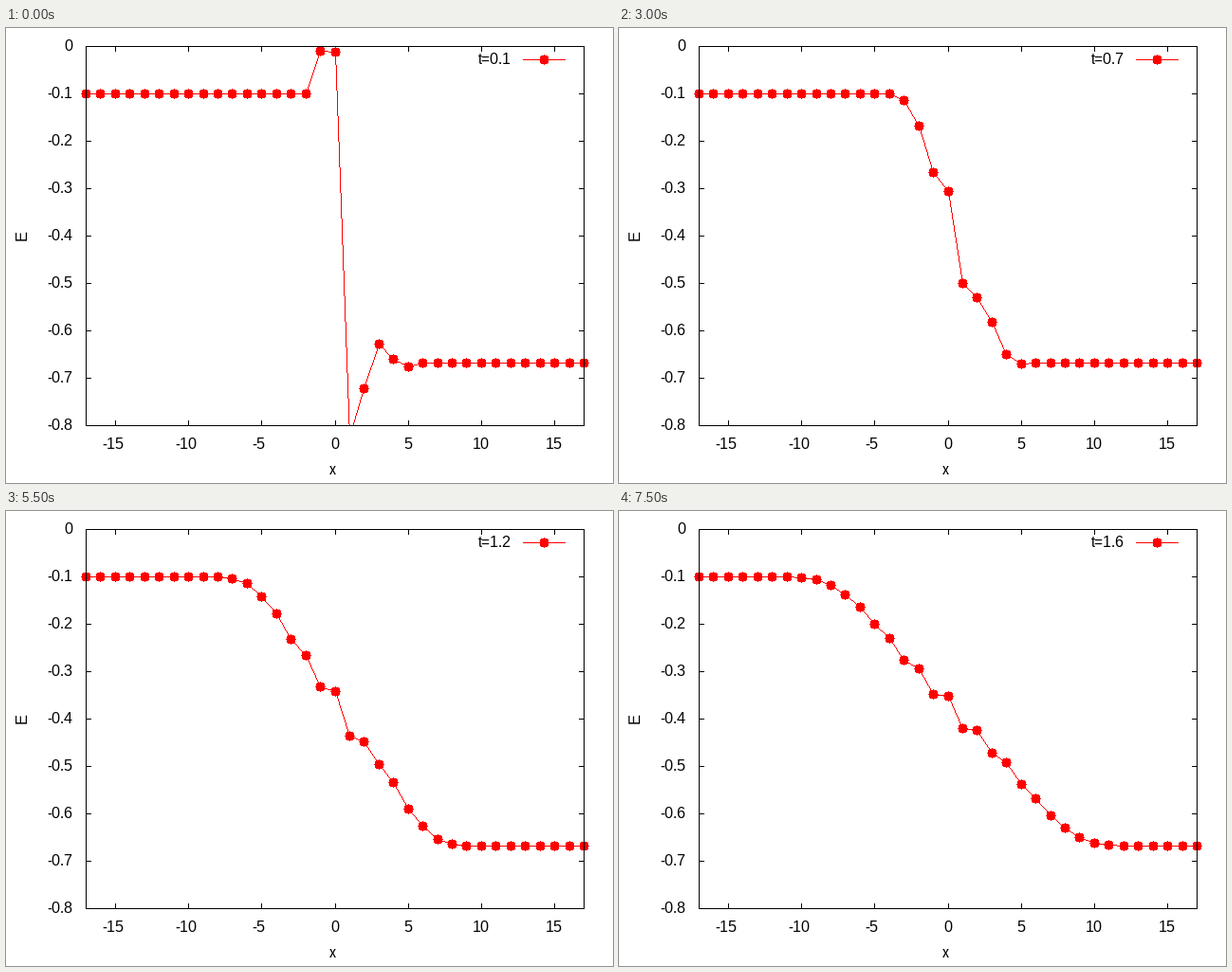
Animation, 640 px wide and 480 px high, one loop 8 s. Source, as a matplotlib script:

```python
import math

import numpy as np
import matplotlib.pyplot as plt
from matplotlib.animation import FuncAnimation

W, H, DPI = 640, 480, 100
LEFT, RIGHT, TOP, BOTTOM = 84, 609, 19, 419
FRAMES, STEP = 16, 500
RED, BLACK = (255, 0, 0), (0, 0, 0)
TICK, RADIUS = 5, 5

plt.rcParams.update({
    "font.family": "Liberation Sans",
    "font.size": 16 * 72 / DPI,
    "text.hinting": "default",
    "text.hinting_factor": 1,
})

sites = np.arange(-17, 18)
erf = np.vectorize(math.erf)

# Initial disturbance at the junction: site -> (strength, fade time)
KICKS = {
    -1: (0.096, 0.25), 0: (0.087, 0.45), 1: (-0.156, 0.58),
    2: (-0.054, 0.8), 3: (0.04, 0.65), 4: (0.008, 0.8), 5: (-0.008, 0.5),
}


def energy(t):
    """Ballistically widening step, plus a ripple and the fading kicks."""
    d = sites - 0.5
    u = d / (t * (1 - math.exp(-(t / 0.45) ** 2)))
    e = -0.384 - 0.284 * erf((0.22 * u + 0.0047 * u ** 3) / math.sqrt(2))
    sign = np.where(sites % 2, -1, 1)
    e += sign * 0.018 / math.sqrt(t) * np.exp(-(d / (2.5 * t)) ** 2)
    for site, (strength, fade) in KICKS.items():
        e[sites == site] += strength / (1 + (t / fade) ** 3)
    return e


def px_x(x):
    return np.floor(LEFT + (x + 17) * (RIGHT - LEFT) / 34 + 0.5).astype(int)


def px_y(e):
    return np.floor(TOP - e * (BOTTOM - TOP) / 0.8 + 0.5).astype(int)


def line(img, x0, y0, x1, y1, color):
    """One pixel wide, without smoothing, kept inside the plot rows."""
    n = max(abs(x1 - x0), abs(y1 - y0)) + 1
    xs = np.rint(np.linspace(x0, x1, n)).astype(int)
    ys = np.rint(np.linspace(y0, y1, n)).astype(int)
    keep = (ys >= TOP) & (ys <= BOTTOM)
    img[ys[keep], xs[keep]] = color


dy, dx = np.mgrid[-RADIUS:RADIUS + 1, -RADIUS:RADIUS + 1]
disc = dx ** 2 + dy ** 2 <= RADIUS ** 2


def dot(img, x, y):
    img[y + dy[disc], x + dx[disc]] = RED


def border(img):
    for x in (LEFT, RIGHT):
        line(img, x, TOP, x, BOTTOM, BLACK)
    for y in (TOP, BOTTOM):
        line(img, LEFT, y, RIGHT, y, BLACK)


fig = plt.figure(figsize=(W / DPI, H / DPI), dpi=DPI, facecolor="white")


def label(x, y, text, ha="center", va="baseline", **kw):
    return fig.text(x / W, 1 - y / H, text, ha=ha, va=va, **kw)


backdrop = np.full((H, W, 3), 255, np.uint8)

for v in range(-15, 16, 5):
    x = px_x(v)
    line(backdrop, x, TOP, x, TOP + TICK, BLACK)
    line(backdrop, x, BOTTOM, x, BOTTOM - TICK, BLACK)
    label(x - (2.5 if v < 0 else 0.5), 444, str(v))

for i in range(9):
    y = px_y(-i / 10)
    line(backdrop, LEFT, y, LEFT + TICK, y, BLACK)
    line(backdrop, RIGHT, y, RIGHT - TICK, y, BLACK)
    label(70.5, y + 5, f"{-i / 10:g}" if i else "0", ha="right")

label(344, 471, "x")
label(16.9, 218.6, "E", va="center", rotation=90)

line(backdrop, 545, 33, 589, 33, RED)
dot(backdrop, 567, 33)
legend = label(532.5, 38, "", ha="right")
picture = fig.figimage(backdrop, origin="upper")


def draw(i):
    t = (i + 1) / 10
    e = energy(t)
    xs, ys = px_x(sites), px_y(e)
    img = backdrop.copy()
    for seg in zip(xs, ys, xs[1:], ys[1:]):
        line(img, *seg, RED)
    for x, y in zip(xs, ys):
        if y <= BOTTOM:
            dot(img, x, y)
    border(img)
    picture.set_data(img)
    legend.set_text(f"t={t:g}")
    return picture, legend


anim = FuncAnimation(fig, draw, frames=FRAMES, interval=STEP, repeat=True,
                     repeat_delay=0)
plt.show()
```
